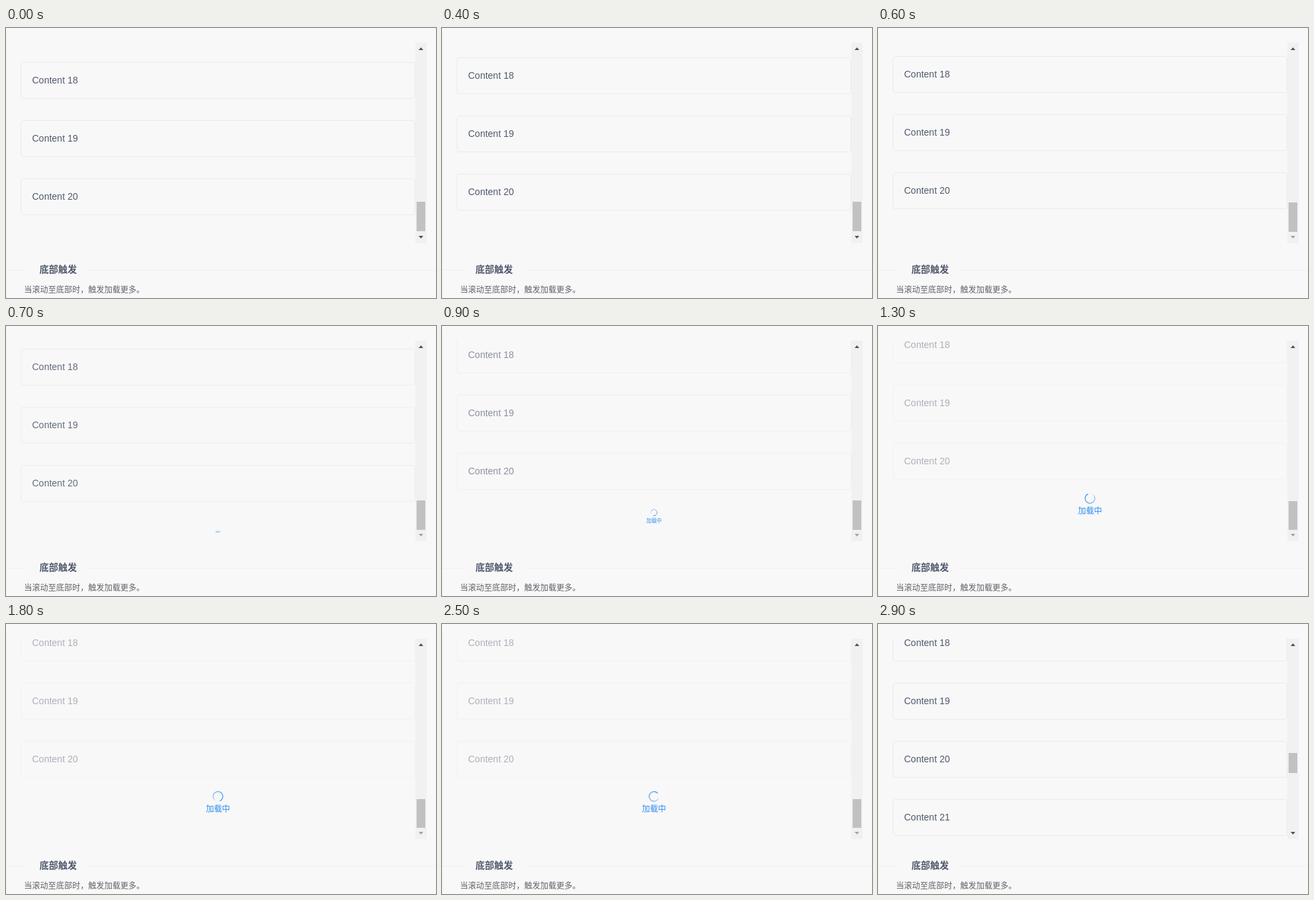
These frames come from a looping animation (643x404 px, 3700 ms). An HTML page:

```html
<!DOCTYPE html>
<html lang="zh-CN">
<head>
<meta charset="utf-8">
<title>Scroll</title>
<style>
  html, body { margin: 0; width: 100%; height: 100%; overflow: hidden; }
  body {
    position: relative;
    background: #f8f8f8;
    color: #515a6e;
    font: 14px/21px "Liberation Sans", "Noto Sans CJK SC", "Noto Sans CJK", sans-serif;
  }
  body *, body *::before { position: absolute; box-sizing: border-box; white-space: nowrap; }
  .edge { left: 0; top: 8px; width: 1px; height: 396px; background: #f0f0f0; }
  .view { left: 22px; top: 22px; width: 590px; height: 300px; overflow: hidden; }
  .list { left: 0; top: 0; width: 100%; }
  .card {
    left: 0;
    width: 590px;
    height: 55px;
    padding: 16px;
    border: 1px solid #e9ebed;
    border-radius: 4px;
  }
  .card span { left: 16px; top: 16px; }
  .loader {
    left: 265px;
    top: 226px;
    width: 60px;
    height: 40px;
    transform-origin: 30px 27px;
    color: #2d8cf0;
  }
  .ring {
    left: 22px;
    top: 2px;
    width: 16px;
    height: 16px;
    border-radius: 50%;
    background: conic-gradient(rgba(45,140,240,0) 8%, rgba(45,140,240,.5) 20%, #2d8cf0 92%, rgba(45,140,240,0) 95%);
    -webkit-mask: radial-gradient(circle, transparent 6.2px, #000 6.9px);
    mask: radial-gradient(circle, transparent 6.2px, #000 6.9px);
  }
  .loader span { left: 12px; top: 20px; font-size: 12px; line-height: 18px; }
  .bar { left: 612px; top: 22px; width: 17px; height: 300px; background: #f1f1f1; }
  .thumb { left: 2px; width: 13px; background: #c1c1c1; }
  .arrow { left: 5px; width: 7px; height: 4px; background: #505050; }
  .up { top: 7px; clip-path: polygon(50% 0, 100% 100%, 0 100%); }
  .down { top: 289px; clip-path: polygon(0 0, 100% 0, 50% 100%); }
  .rule { top: 362px; height: 1px; background: #efefef; }
  h2 { margin: 0; left: 50px; top: 351px; font-size: 14px; line-height: 21px; font-weight: 700; }
  p { margin: 0; left: 27px; top: 383px; font-size: 12px; line-height: 18px; color: #5f6268; }
</style>
</head>
<body>
<div class="edge"></div>
<div class="view">
  <div class="list"></div>
  <div class="loader"><div class="ring"></div><span>加载中</span></div>
</div>
<div class="bar">
  <div class="arrow up"></div>
  <div class="thumb"></div>
  <div class="arrow down"></div>
</div>
<div class="rule" style="left:0;width:32px"></div>
<h2>底部触发</h2>
<div class="rule" style="left:123px;right:0"></div>
<p>当滚动至底部时，触发加载更多。</p>
<script>
  const LOOP = 3700, STEP = 100, LOADED = 2600;
  const $ = s => document.querySelector(s);
  const list = $('.list'), loader = $('.loader'), ring = $('.ring');
  const thumb = $('.thumb'), down = $('.down');

  for (let i = 0; i < 4; i++) {
    const card = document.createElement('div');
    card.className = 'card';
    card.style.top = 29 + i * 87 + 'px';
    card.innerHTML = `<span>Content ${18 + i}</span>`;
    list.append(card);
  }
  const newCard = list.lastChild;

  // Value of the last [time, ...values] row already reached
  const at = (rows, t) => rows.filter(r => r[0] <= t).pop().slice(1);

  const NUDGE = [[0, 0], [300, 4], [400, 7], [600, 9]];
  const REVEAL = [[0, 0], [700, .2], [800, .42], [900, .64], [1000, .85], [1100, .97], [1200, 1]];
  const FADE_IN = [[LOADED, .55], [2700, .7], [2800, .9], [2900, 1]];
  const THUMB = [[0, 260, 44], [100, 259, 44], [300, 260, 44], [600, 261, 44], [1000, 262, 43], [LOADED, 193, 30]];

  function draw(now) {
    const t = Math.floor(now % LOOP / STEP) * STEP;
    const loaded = t >= LOADED;
    const [reveal] = at(REVEAL, t);
    const shift = Math.round(at(NUDGE, t)[0] + 41 * reveal);

    list.style.transform = `translateY(${-shift}px)`;
    list.style.opacity = loaded ? at(FADE_IN, t)[0] : 1 - .55 * reveal;
    newCard.style.display = loaded ? '' : 'none';

    loader.style.display = loaded || !reveal ? 'none' : '';
    loader.style.transform = `translateY(${50 - shift}px) scale(${reveal})`;
    ring.style.transform = `rotate(${(t - 1300) * .36}deg)`;

    const [top, height] = at(THUMB, t);
    thumb.style.top = top - 22 + 'px';
    thumb.style.height = height + 'px';
    down.style.background = t >= 600 && !loaded ? '#a3a3a3' : '#505050';
  }

  function tick() {
    draw(performance.now());
    requestAnimationFrame(tick);
  }
  tick();
</script>
</body>
</html>
```
